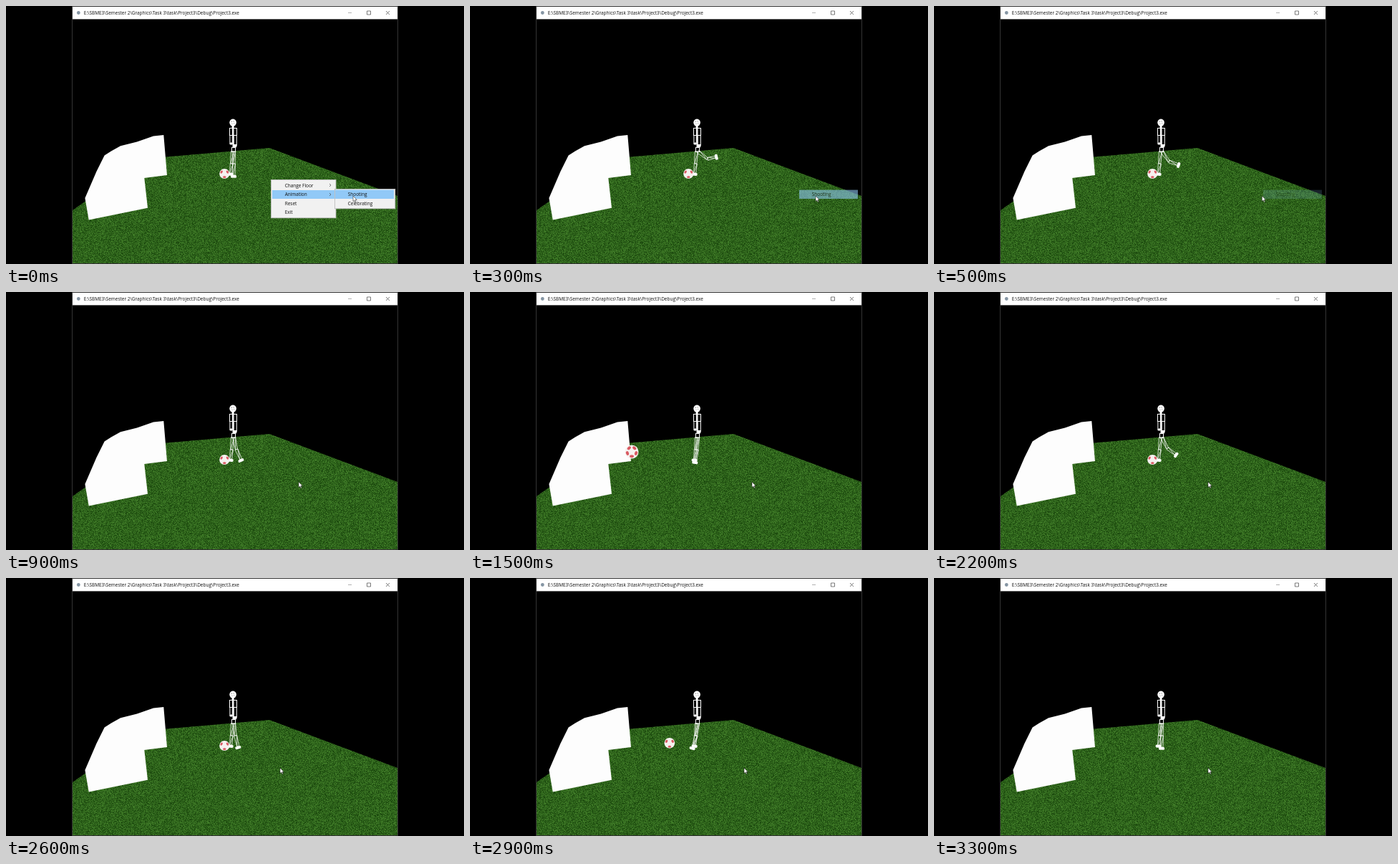
Recreate the animation shown at these times as an HTML page with a canvas. Size 640 by 360 pixels, loop 3.4 s.

```html
<!DOCTYPE html>
<html lang="en">
<head>
<meta charset="utf-8">
<title>Shooting</title>
<style>
html, body { margin: 0; width: 100%; height: 100%; overflow: hidden; background: #000; }
canvas, svg { position: absolute; left: 0; top: 0; width: 640px; height: 360px; }
text { font: 6.46px "Open Sans", "Noto Sans", sans-serif; fill: #111; }
.thin { fill: none; stroke: #444; stroke-width: .7; }
.panel { fill: #f1f1f1; stroke: #bbb; stroke-width: .8; }
.lit { fill: #91c9f7; }
</style>
</head>
<body>
<canvas id="stage" width="640" height="360"></canvas>
<svg viewBox="0 0 640 360">
  <rect x="93" y="1" width="454" height="17.4" fill="#fff"/>
  <circle cx="101.3" cy="9.5" r="2.4" fill="#8595a3"/>
  <text x="108.8" y="11.8">E:\SBME3\Semester 2\Graphics\Task 3\task\Project3\Debug\Project3.exe</text>
  <path class="thin" d="M478 9.5h5" opacity=".6"/>
  <path class="thin" d="M504.5 7h5v5h-5zM531 7l5 5M536 7l-5 5"/>
  <g id="menu">
    <rect class="panel" x="370.4" y="242.4" width="90.6" height="53.4"/>
    <rect class="lit" x="372" y="257" width="88" height="12"/>
    <text x="389.7" y="252.6">Change Floor</text>
    <text x="389.7" y="265.3">Animation</text>
    <text x="389.7" y="277.7">Reset</text>
    <text x="389.7" y="290.4">Exit</text>
    <path class="thin" d="M452 248l2 2-2 2M452 261l2 2-2 2"/>
    <rect class="panel" x="459.4" y="255.4" width="84.4" height="27.4"/>
    <text x="477.8" y="277.7">Celebrating</text>
  </g>
  <g id="choice">
    <rect class="lit" x="460" y="256.6" width="82" height="12.4"/>
    <text x="477.8" y="265.3">Shooting</text>
  </g>
  <path id="cursor" d="M0 0V7.6L1.8 6L3 8.8L4.2 8.2L3 5.5H5.3Z" fill="#fff" stroke="#111" stroke-width=".5"/>
</svg>
<script>
const LOOP = 3400, STEP = 100, CYCLE = 1600;
const $ = id => document.getElementById(id);
const ctx = $('stage').getContext('2d');

// linear motion through [time, value] points
function track(keys, t) {
  const i = keys.findIndex(k => t <= k[0]);
  if (i < 0) return keys[keys.length - 1][1];
  if (i === 0) return keys[0][1];
  const [t0, a] = keys[i - 1], [t1, b] = keys[i];
  return a + (b - a) * (t - t0) / (t1 - t0);
}

// thigh angle in degrees: wind up, swing through, settle
const SWING = [[-200, 0], [0, 52], [300, 27], [1000, -8], [1400, 0]];
const MOUSE_X = [[0, 485], [300, 483], [900, 409], [1500, 394], [2200, 383]];

function shape(c, pts) {
  c.beginPath();
  for (const [x, y] of pts) c.lineTo(x, y);
  c.closePath();
}

function dot(x, y, rx, ry, color, turn = 0) {
  ctx.fillStyle = color;
  ctx.beginPath();
  ctx.ellipse(x, y, rx, ry, turn, 0, 7);
  ctx.fill();
}

function makeScene() {
  const cv = document.createElement('canvas');
  cv.width = 640;
  cv.height = 360;
  const c = cv.getContext('2d');
  const img = c.createImageData(640, 360);
  let seed = 7;
  const rand = () => (seed = (seed * 1664525 + 1013904223) >>> 0) / 4294967296;
  for (let i = 0; i < img.data.length; i += 4) {
    const n = rand() - .5;
    img.data[i] = 46 + n * 42;
    img.data[i + 1] = 99 + n * 58;
    img.data[i + 2] = 27 + n * 30;
    img.data[i + 3] = 255;
  }
  c.putImageData(img, 0, 0);
  c.globalCompositeOperation = 'destination-in';
  shape(c, [[93, 285], [196, 213], [368, 198], [547, 265], [547, 359], [93, 359]]);
  c.fill();
  c.globalCompositeOperation = 'destination-over';
  c.fillStyle = '#000';
  c.fillRect(0, 0, 640, 360);
  c.globalCompositeOperation = 'source-over';
  c.strokeStyle = '#333';
  c.strokeRect(92.5, .5, 455, 359);
  c.fillStyle = '#fdfdfd';
  shape(c, [[220.3, 180], [225, 236], [193.3, 240], [198, 281.8], [115.7, 298.6], [110.4, 268],
    [126.4, 231], [137.6, 208.4], [147, 202.4], [160, 195.3], [183, 189.5], [206, 181.4]]);
  c.fill();
  return cv;
}

// open wire box along a bone, returns its far end
function bone(x, y, deg, len, w1, w2) {
  const a = deg * Math.PI / 180, s = Math.sin(a), c = Math.cos(a);
  const ex = x + s * len, ey = y + c * len;
  shape(ctx, [[x + c * w1, y - s * w1], [ex + c * w2, ey - s * w2],
    [ex - c * w2, ey + s * w2], [x - c * w1, y + s * w1]]);
  ctx.moveTo(x + c * w1, y - s * w1);
  ctx.lineTo(ex - c * w2, ey + s * w2);
  ctx.stroke();
  return [ex, ey];
}

function leg(hip, thigh, shin, len) {
  ctx.strokeStyle = '#f2f4f0';
  ctx.lineWidth = .8;
  const knee = bone(hip, 203, thigh, 17, 2.2, 1.5);
  const ankle = bone(...knee, shin, len, 2, 1.5);
  ctx.save();
  ctx.translate(...ankle);
  ctx.rotate(-shin * Math.PI / 180);
  ctx.fillStyle = '#fff';
  ctx.beginPath();
  ctx.roundRect(-4.4, 0, 8, 3.8, 1.4);
  ctx.fill();
  ctx.restore();
}

function body() {
  ctx.fillStyle = '#fff';
  ctx.fillRect(315.6, 166, 3, 4);
  ctx.fillRect(316.5, 169, 1.4, 28);
  ctx.fillRect(313.2, 190.5, 3, 3);
  ctx.fillRect(317.5, 193, 4.8, 4.2);
  ctx.strokeStyle = '#fff';
  ctx.lineWidth = 1;
  ctx.strokeRect(312.5, 170.5, 4, 10);
  ctx.strokeRect(312.9, 180.5, 3.4, 12);
  ctx.strokeRect(318, 170.5, 4.5, 10);
  ctx.strokeRect(318.3, 180.5, 4, 14);
  ctx.strokeRect(315.5, 197.5, 5, 6);
  dot(317.1, 162.6, 4.8, 5.2, '#fff');
  for (let i = 0; i < 4; i++) {
    const a = i * Math.PI / 2 + .6;
    dot(317.1 + 2 * Math.cos(a), 162.6 + 2 * Math.sin(a), .6, .6, '#777');
  }
}

// spots around the rim: three at rest, five on the larger rolling ball
function ball(k) {
  const x = 305.3 - 79.3 * k, y = 234 - 11 * k, r = 7.1 + 2.4 * k * k;
  const spots = k < .5 ? 3 : 5;
  dot(x, y, r, r, '#f6f1ef');
  for (let i = 0; i < spots; i++) {
    const a = Math.PI / 2 + i * 2 * Math.PI / spots;
    dot(x + Math.cos(a) * r * .67, y + Math.sin(a) * r * .67, r * .21, r * .31, '#d95a62', a);
  }
}

const scene = makeScene();

function draw(t) {
  const u = t < 200 ? -200 : (t - 100) % CYCLE - 200;
  const thigh = track(SWING, u);
  const flight = Math.max(0, (u - 900) / 300);
  const ready = t < 200 || u > -200;

  ctx.drawImage(scene, 0, 0);
  leg(316.5, -4, -5, 13);
  leg(318.5, thigh, thigh * 2, 16 - thigh / 10);
  body();
  if (ready && flight <= 1) ball(flight);

  $('menu').style.display = t < 200 ? '' : 'none';
  $('choice').style.opacity = Math.max(0, 1 - Math.max(0, t - 100) / 480);
  $('cursor').setAttribute('transform', `translate(${track(MOUSE_X, t)} 265)`);
}

const start = performance.now();
function tick() {
  const t = (performance.now() - start) % LOOP;
  draw(Math.floor(t / STEP) * STEP);
  requestAnimationFrame(tick);
}
tick();
</script>
</body>
</html>
```
